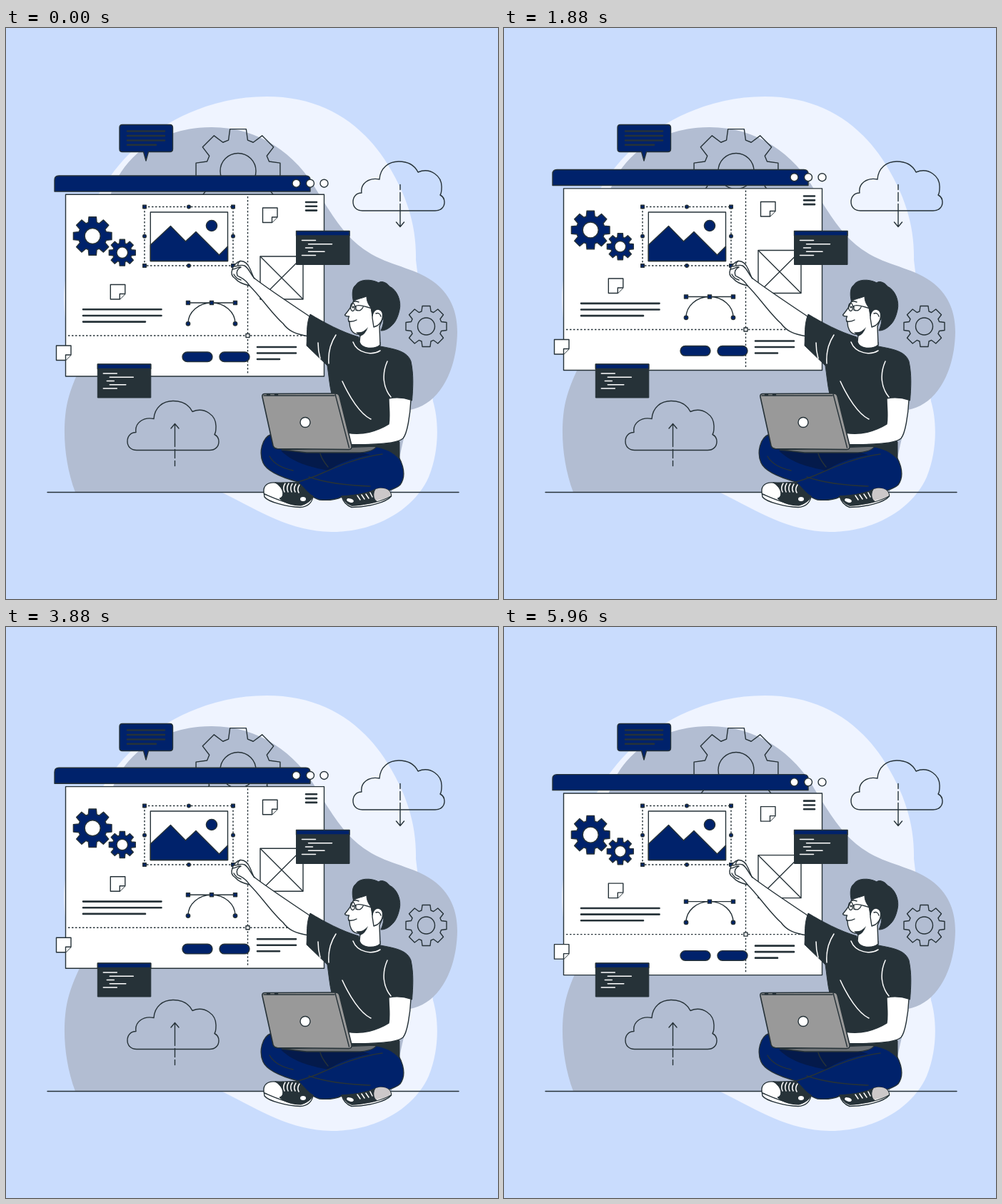
An HTML page for the animation above (6.04 s loop, 689 by 800 pixels).

```html
<!DOCTYPE html>
<html lang="en">
<head>
<meta charset="utf-8">
<title>Designing a page</title>
<style>
html, body { margin: 0; width: 100%; height: 100%; overflow: hidden; background: #c9dcfd; }
svg { display: block; width: 689px; height: 800px; }
.line { fill: none; stroke: #263238; stroke-width: 1.4; stroke-linecap: round; stroke-linejoin: round; }
.paper { fill: #fff; stroke: #263238; stroke-width: 1.4; stroke-linejoin: round; }
.navy { fill: #00226b; stroke: #263238; stroke-width: 1.4; stroke-linejoin: round; }
.dark { fill: #263238; stroke: #263238; stroke-width: 1; stroke-linejoin: round; }
.bold { fill: none; stroke: #263238; stroke-width: 2.6; stroke-linecap: round; }
.white { fill: none; stroke: #fff; stroke-width: 1.5; stroke-linecap: round; }
.dash { fill: none; stroke: #263238; stroke-width: 1.4; stroke-dasharray: 2.5 2.5; }
</style>
</head>
<body>
<svg viewBox="0 0 689 800">
  <defs>
    <path id="cloud" class="line" d="M499 256C491 256 486 251 486 243.500C486 236 491 231 498 231C496 218 508 209 523 212C524 196 536 187 550 187C562 187 572 192 577 202C594 195 611 207 610 224C610 228 610 231 608 234C612 236 614 240 614 244C614 251 609 256 601 256Z"/>
    <path id="arrow" class="line" d="M0 0V32M0 36V48M0 52V59M-5.500 6.500L0 0L5.500 6.500"/>
    <g id="note" class="paper"><path d="M0 0H20.500V13L13 20.500H0Z"/><path d="M20.500 13H13V20.500"/></g>
    <g id="code">
      <path class="dark" d="M0 0H74.500V47H0Z"/>
      <path class="navy" stroke-width="1" d="M0 0H74.500V6.500H0Z"/>
      <path class="white" d="M8 13H27M17 18.200H50M13 23.400H23M17 28.700H39.500M8 34H27"/>
    </g>
  </defs>

  <!-- backdrop -->
  <path fill="#eff4ff" d="M365 96C440 96 494 130 530 184C560 230 575 275 574 325L598 523C607 553 606 595 592 629C572 674 519 706 456 706C398 705 357 678 303 651L240 620C120 570 82 450 81 380C81 330 106 264 135 225C180 148 270 96 365 96Z"/>
  <path fill="#b2bdd2" d="M97 650.500C83 613 79 570 84 535C87 515 94 497 103 478C120 420 125 300 147 232C162 184 210 139 288 139C354 139 406 176 436 229C462 271 479 298 512 317C544 335 576 337 602 358C624 376 632 400 632 426C631 485 604 528 566 535L540 650.500Z"/>
  <path class="line" stroke-width="1.600" d="M58 650.500H634"/>
  <g id="outlineGears" class="line"></g>
  <use href="#cloud"/>
  <use href="#cloud" x="-316" y="335.500"/>
  <use href="#arrow" transform="translate(552 278.500) scale(1 -1)"/>
  <use href="#arrow" x="236.500" y="554.500"/>

  <g class="navy">
    <path d="M163 135.500H229.500Q233.500 135.500 233.500 139.500V169.500Q233.500 173.500 229.500 173.500H199.500L196 186L192.500 173.500H163Q159 173.500 159 169.500V139.500Q159 135.500 163 135.500Z"/>
  </g>
  <path class="bold" d="M170 144.500H222M170 151H222M170 157.500H222M170 163.800H210"/>

  <!-- floating page -->
  <g id="page">
    <path class="navy" d="M68 229V213Q68 207 74 207H420Q426 207 426 213V229Z"/>
    <g class="paper">
      <circle cx="406.500" cy="217.700" r="5.500"/><circle cx="426" cy="217.700" r="5.500"/><circle cx="445.500" cy="217.700" r="5.500"/>
      <path d="M83.500 233.300H445.500V488H83.500Z"/>
    </g>
    <path class="dash" d="M338.500 236V485M87 431H445"/>
    <path class="paper" d="M336 428.500H341V433.500H336Z"/>
    <g id="solidGears" class="navy" fill-rule="evenodd"></g>
    <use href="#note" x="359.500" y="252"/>
    <use href="#note" x="146.300" y="359.500"/>
    <use href="#note" x="70.500" y="445"/>
    <path class="bold" d="M420 244H435M420 249.800H435M420 255.600H435M108 394.300H217.500M108 403H217.500M108 411.600H195M352 447H406M352 455.500H406M352 464H383"/>
    <g class="paper"><path d="M356 320H416V380H356Z"/><path d="M356 320L416 380M416 320L356 380"/></g>
    <path class="line" d="M255 385H321M255 414A33 29 0 0 1 321 414"/>
    <path class="navy" d="M252.500 382.500h5v5h-5zM285.500 382.500h5v5h-5zM318.500 382.500h5v5h-5z"/>
    <g class="navy">
      <circle cx="255" cy="414.300" r="2.700"/><circle cx="321" cy="414.300" r="2.700"/>
      <rect x="247" y="454" width="42" height="13.600" rx="6.800"/><rect x="299" y="454" width="42" height="13.600" rx="6.800"/>
    </g>
  </g>

  <!-- selected picture -->
  <path class="dash" d="M194 250.500H318V333H194Z"/>
  <path class="paper" d="M202.300 258H310.500V326.500H202.300Z"/>
  <path class="navy" d="M202.300 304L230.500 277.500L251.500 299L266 285.500L298.500 318L310.500 306V326.500H202.300Z"/>
  <circle class="navy" cx="288" cy="277" r="7.600"/>
  <g class="navy">
    <path d="M191.700 248.200h4.600v4.600h-4.600zM315.700 248.200h4.600v4.600h-4.600zM191.700 330.700h4.600v4.600h-4.600zM315.700 330.700h4.600v4.600h-4.600z"/>
    <circle cx="256" cy="250.500" r="2.300"/><circle cx="256" cy="333" r="2.300"/><circle cx="194" cy="291.700" r="2.300"/><circle cx="318" cy="291.700" r="2.300"/>
  </g>
  <use href="#code" x="406.500" y="284.500"/>
  <use href="#code" x="128.300" y="471"/>

  <!-- reaching arm -->
  <path class="paper" d="M347 350C365 364 392 382 425 404L424 432C405 429 395 424 388 414C372 400 358 378 341 361C332 359 325 356 321 351C316 348 315 343 317 338C318 333 323 328 328 326.500C334 326 339 331 342 338Z"/>
  <path class="line" stroke-width="1.200" d="M319 334C324 334 329 331 334 333C340 336 341 343 348 351M317 338C322 338 325 334 329 335M329 335C324 337 322 342 324 347M324 347C329 350 335 351 341 361M319 345C321 349 325 352 329 353M328 326.500C325 329 324 331 325 333"/>

  <!-- legs -->
  <path class="navy" d="M372 569C358 574 354 595 360 609C365 621 387 630 409 636C419 648 427 658 439 661C450 662 462 661 470 657C499 655 539 652 552 640C563 625 553 601 543 594L519 586L380 588Z"/>
  <path fill="#041a4b" d="M385 592C400 608 425 615 451 620C466 610 483 603 510 598L490 592Z"/>
  <path class="line" d="M527 597C493 602 469 612 442 624C431 629 419 633 409 636M424 629C450 638 480 641 510 642M440 596C442 604 446 609 451 615M369 600C375 611 388 617 402 620"/>

  <!-- shoes -->
  <g stroke-linejoin="round">
    <path class="paper" d="M361 650C360 641 367 636 377 637L400 640L430 656C429 665 422 671 412 671.500C394 671 367 664 362 657Z"/>
    <path class="dark" d="M381 637C392 637 404 636 410 637C418 645 424 653 430 656C428 662 421 667 413 669C400 669 389 665 383 659C391 657 389 644 377 637Z"/>
    <path class="line" d="M362 653C374 658 392 667 413 668"/>
    <path class="white" d="M391 638Q387 644 390 650M396 638Q392 644 395 650M401 638.500Q397 644 400 650M406 639Q402 645 405 650M411 640Q407 646 410 651"/>
    <ellipse cx="416" cy="660" rx="4" ry="3" fill="#fff"/>
    <path class="paper" d="M470 656C490 655 507 652 518 646C530 642 540 648 539.500 656C532 665 508 671 484 671.500C477 669 472 663 470 656Z"/>
    <path class="dark" d="M470 656C489 655 505 652 517 647C514 652 515 659 519 663C507 667 493 669 484 669C477 667 473 662 470 656Z"/>
    <path fill="#ccc8c9" d="M518 646C530 642 540 648 538.500 655C533 659 525 661 518 662C514 657 515 650 518 646Z"/>
    <path class="line" d="M484 669C508 668 529 662 539 656"/>
    <path class="white" d="M492 655L496 661M498 654L502 660M504 653L508 659M510 651L513 657"/>
    <ellipse cx="482" cy="662" rx="5" ry="2.500" transform="rotate(18 482 662)" fill="#fff"/>
  </g>

  <!-- body -->
  <path class="dark" d="M426 401C446 413 470 426 494 433L495 440H524V446C546 450 562 453 567 467C571 485 570 504 568.500 522L537 519C537 535 538 550 538 560L551 580V604C542 594 530 588 519 587L478 585L456 513C453 500 452 486 450 473L421 445C422 430 420 415 426 401Z"/>
  <path class="paper" d="M536 519C546 517 558 518 567 521C566 542 562 568 556 575C547 583 515 584 482 583.500L478 567C499 571 520 565 536 555C538 543 536 532 536 519Z"/>
  <path class="paper" d="M488 376C487 386 482 393 474.500 402C475 404 478 404 480.500 404C479 407 479 410 481 412C481 420 484 428 492 429H496L495 440C498 450 516 451 524 444L523 418L530 402L517 372Z"/>
  <path fill="#263238" d="M490 426Q500 428 507 419Q503 430 496 432Z"/>
  <path class="dark" d="M486.500 383C484 373 485 363 490 360C494 352 511 351 522 357C525 354 533 356 537 362C548 367 554 383 551 395C549 405 545 413 540 417C535 422 530 424 525 424C531 411 530 397 521 394C515 394 514 400 513 404L511 392C507 387 505 382 505 376C498 379 492 379 486.500 383Z"/>
  <path class="paper" d="M513 406C513 397 518 393 523 394.500C530 397 529 411 520 417L515 419Z"/>
  <g class="line" stroke-width="1.200">
    <ellipse cx="485.500" cy="391" rx="3" ry="5.500"/>
    <path d="M489 390Q493 386 512 393M490 390V395Q497 398 500 391M480 411Q486 412 491 409M486 384Q489 382 494 384M518 400Q523 398 525 404"/>
    <circle cx="486" cy="391" r=".8" fill="#263238"/>
  </g>
  <path class="white" d="M486 440C492 456 513 459 524 452M437 441C437 449 438 456 440 463M462 430C454 442 451 456 452 470M534 467C526 485 528 504 539 517M471 495C481 517 496 541 511 548"/>

  <!-- laptop -->
  <path fill="#6d7174" stroke="#263238" stroke-width="1.300" d="M386 591L519 586C515 593 505 595 490 595H421Z"/>
  <path fill="#999" stroke="#263238" stroke-width="1.600" d="M362 512.500L461 512Q466 512 467 516L484 585Q485 590.500 480 590.500L380 589.500Q375 589 374 585L359 517Q358 513 362 512.500Z"/>
  <path class="line" d="M461 513L480.500 588M361 515H460"/>
  <path class="bold" stroke-width="1.500" d="M366 514H369M377 514H380"/>
  <circle class="paper" cx="419" cy="552.500" r="7"/>
</svg>
<script>
const LOOP = 6040, RISE = 13.6;
const page = document.getElementById('page');

// Eight trapezoid teeth around a round hole
function gear(x, y, outer, root, hole) {
  const points = [];
  for (let i = 0; i < 8; i++) {
    for (const [r, turn] of [[root, -.3], [outer, -.19], [outer, .19], [root, .3]]) {
      const a = i * Math.PI / 4 + turn;
      points.push((x + r * Math.sin(a)).toFixed(2) + ' ' + (y - r * Math.cos(a)).toFixed(2));
    }
  }
  return `<path d="M${points.join('L')}ZM${x - hole} ${y}a${hole} ${hole} 0 1 0 ${2 * hole} 0a${hole} ${hole} 0 1 0 ${-2 * hole} 0Z"/>`;
}

document.getElementById('outlineGears').innerHTML =
  gear(325, 200.5, 60, 45.5, 25) + gear(588.5, 418, 29, 22, 12);
document.getElementById('solidGears').innerHTML =
  gear(121.2, 291.5, 27.3, 20, 11) + gear(162.8, 314.7, 18.8, 13.5, 7.8);

function draw() {
  const phase = performance.now() % LOOP / LOOP;
  const y = -RISE * (1 - Math.abs(1 - 2 * phase));
  page.setAttribute('transform', `translate(0 ${y.toFixed(2)})`);
  requestAnimationFrame(draw);
}
draw();
</script>
</body>
</html>
```
